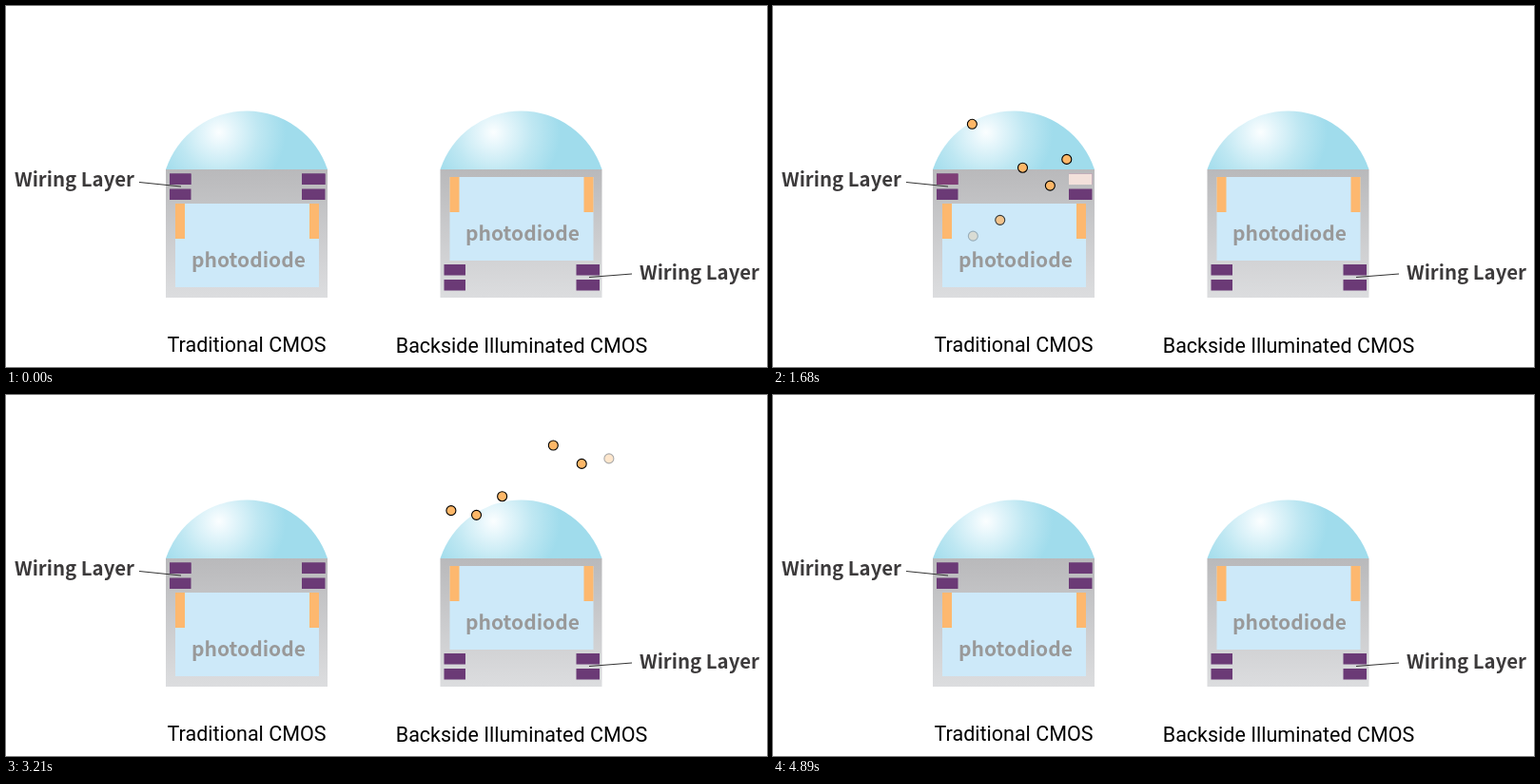
Recreate the animation shown at these times as an HTML page. Size 800 px wide and 380 px high, loop 5040 ms.

```html
<!DOCTYPE html>
<html lang="en">
<head>
<meta charset="utf-8">
<title>CMOS sensor comparison</title>
<style>
html, body { margin: 0; width: 100%; height: 100%; overflow: hidden; background: #fff; }
svg { display: block; width: 800px; height: 380px; }
.label { font: bold 20.4px "Noto Sans CJK JP", "Noto Sans CJK SC", "Noto Sans", sans-serif; fill: #3c3a3b; }
.diode { font-size: 21px; fill: #999; text-anchor: middle; }
.caption { font: 21.5px Roboto, sans-serif; fill: #000; text-anchor: middle; }
.wire { fill: #6b3a76; }
.photon { fill: #fdb768; stroke: #000; stroke-width: 1.1; }
</style>
</head>
<body>
<svg id="stage" viewBox="0 0 800 380">
  <defs>
    <linearGradient id="body" x2="0" y2="1">
      <stop stop-color="#b9b9bb"/><stop offset="1" stop-color="#dcdddf"/>
    </linearGradient>
    <radialGradient id="lens" gradientUnits="userSpaceOnUse" cx="224" cy="133" r="70">
      <stop stop-color="#fbfeff"/><stop offset=".2" stop-color="#e6f6fb"/>
      <stop offset=".6" stop-color="#bee7f2"/><stop offset="1" stop-color="#a0dcec"/>
    </radialGradient>
    <g id="shell">
      <path d="M168 172A89.500 89.500 0 0 1 338 172Z" fill="url(#lens)"/>
      <rect x="168" y="172" width="170" height="135" fill="url(#body)"/>
    </g>
    <g id="diode">
      <path d="M178 208h151v88h-151z" fill="#cde9f9"/>
      <path d="M178 208h10v37h-10zM319 208h10v37h-10z" fill="#fdb86f"/>
    </g>
    <g id="wirePair">
      <rect id="leftWire" x="172" y="176.500" width="22.500" height="11.500"/>
      <rect id="rightWire" x="311" y="176.500" width="24.500" height="11.500"/>
    </g>
    <g id="wires" class="wire"><use href="#wirePair"/><use href="#wirePair" y="16"/></g>
  </defs>

  <use href="#shell"/><use href="#diode"/><use href="#wires"/>
  <use id="hitLeft" href="#leftWire"/><use id="hitRight" href="#rightWire"/>
  <g transform="translate(288.500)">
    <use href="#shell"/><use href="#diode" y="-28"/><use href="#wires" y="95.500"/>
  </g>

  <path d="M140 185.500L184 190M613 285.500L658 282" stroke="#333" fill="none"/>
  <text class="label" x="9" y="189.500">Wiring Layer</text>
  <text class="label" x="666" y="287.500">Wiring Layer</text>
  <text class="label diode" x="255" y="274.500">photodiode</text>
  <text class="label diode" x="543" y="246.500">photodiode</text>
  <text class="caption" x="253" y="363.500">Traditional CMOS</text>
  <text class="caption" x="542" y="365">Backside Illuminated CMOS</text>
</svg>
<script>
const LOOP = 5040, STEP = 30;
const LIFE = 1710, BEND = 825, FADE_IN = 90, FADE_OUT = 300;
const FIRST = 30, STAGGER = 150;

// Each photon flies straight to the bend, then straight on to its end.
const middle = { from: [470, 30], bend: [497, 136], to: [505, 252] };
const inner = { from: [506, 30], bend: [527.5, 135.5], to: [534.5, 256] };
const absorbed = { from: [451, 63], bend: [482, 170.5], to: [512.5, 263.5] };
const reflected = { from: [445, 61], bend: [478, 171], to: [522, 90] };

const mix = (a, b, k) => a.map((v, i) => v + (b[i] - v) * k);

// Three photons leave one after the other; place() maps x onto the sensor.
const trio = (start, third, place) => [middle, inner, third].map((path, i) => {
  const dot = document.createElementNS("http://www.w3.org/2000/svg", "circle");
  dot.setAttribute("class", "photon");
  dot.setAttribute("r", 5);
  stage.append(dot);
  return { dot, path, place, born: start + FIRST + STAGGER * i };
});

const LEFT = 15, LEFT_MIRRORED = 420;
const photons = [
  ...trio(LEFT, reflected, x => x - 294),
  ...trio(LEFT_MIRRORED, reflected, x => 792 - x),
  ...trio(2430, absorbed, x => x),
  ...trio(2850, absorbed, x => 1086 - x)
];

function fly({ dot, path, place, born }, t) {
  const age = t - born;
  const [x, y] = age < BEND
    ? mix(path.from, path.bend, age / BEND)
    : mix(path.bend, path.to, (age - BEND) / (LIFE - BEND));
  const opacity = Math.min(1, age / FADE_IN, (LIFE - age) / FADE_OUT);
  dot.setAttribute("cx", place(x));
  dot.setAttribute("cy", y);
  dot.setAttribute("opacity", Math.max(0, opacity));
}

// A struck wire turns white and cools down: blue fades first, red last.
function glow(wire, age) {
  const cool = (base, time) =>
    Math.round(base + (255 - base) * (age < 0 ? 0 : Math.exp(-((age / time) ** 2))));
  wire.setAttribute("fill", `rgb(${cool(107, 360)},${cool(58, 260)},${cool(118, 190)})`);
}

function draw(now) {
  const t = Math.floor(now % LOOP / STEP) * STEP;
  const hit = FIRST + 2 * STAGGER + BEND;
  photons.forEach(photon => fly(photon, t));
  glow(hitLeft, t - LEFT - hit);
  glow(hitRight, t - LEFT_MIRRORED - hit);
}

const begin = performance.now();
function tick() {
  draw(performance.now() - begin);
  requestAnimationFrame(tick);
}
tick();
</script>
</body>
</html>
```
